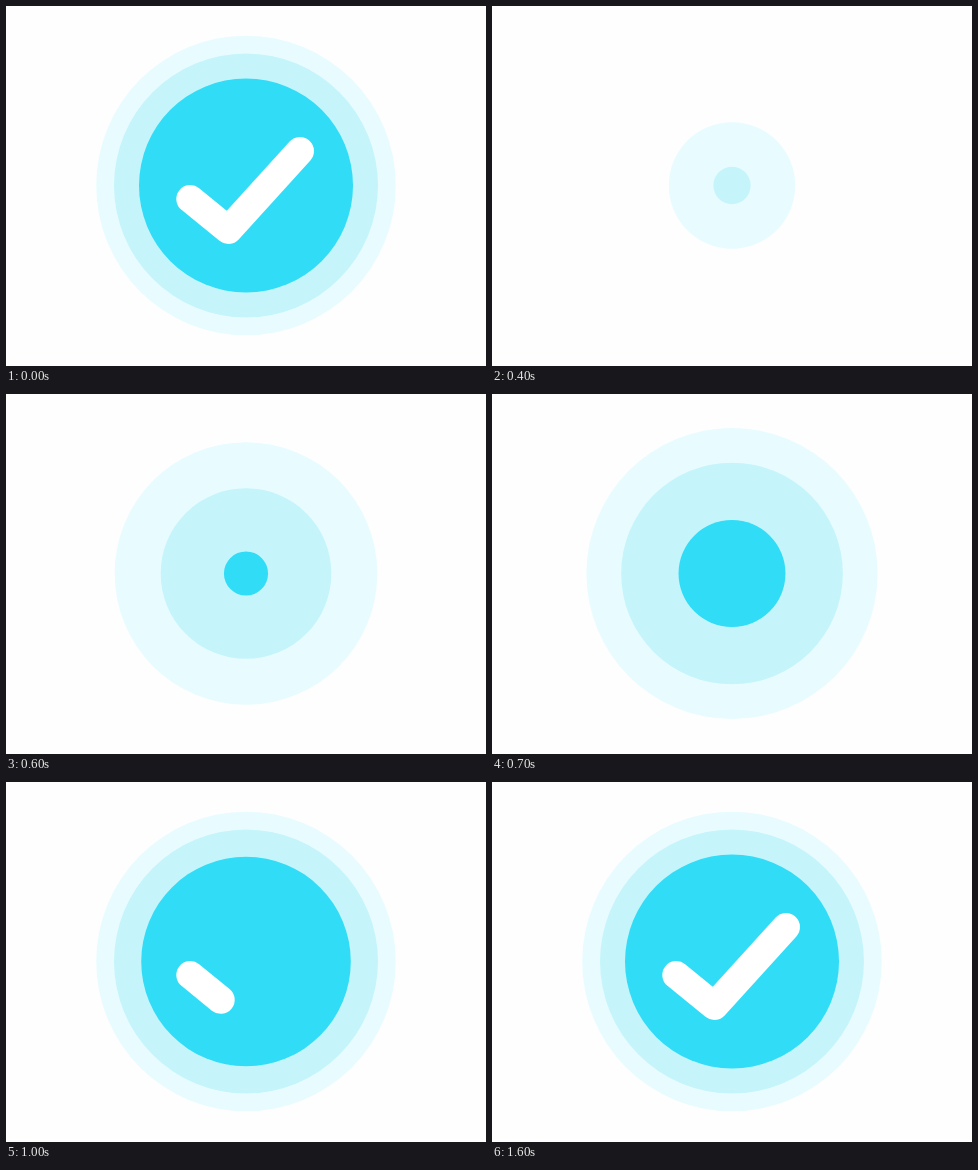
Write an HTML page that moves like this. It is 480 px wide and 360 px high and loops after 2.3 s.

```html
<!DOCTYPE html>
<html lang="en">
<head>
<meta charset="utf-8">
<title>Check mark</title>
<style>
  html, body { margin: 0; width: 100%; height: 100%; overflow: hidden; background: #fefefe; }
  svg { display: block; width: 480px; height: 360px; }
</style>
</head>
<body>
<svg viewBox="0 0 480 360">
  <g id="discs">
    <circle cx="240" cy="179.5" fill="#e8fcff"/>
    <circle cx="240" cy="179.5" fill="#c5f5fb"/>
    <circle cx="240" cy="179.5" fill="#31dcf7"/>
  </g>
  <path id="check" d="M184.3 193 L222.3 224 L294 145" pathLength="1" fill="none"
        stroke="#fff" stroke-width="28" stroke-linecap="round" stroke-linejoin="round"/>
</svg>
<script>
const LOOP = 2300, STEP = 100;
const discs = document.querySelectorAll('#discs circle');
const check = document.getElementById('check');

// Final radius, start and duration in ms, and x of the two easing handles
const growth = [
  [149.8, 200, 600, 0.27, 0.4],
  [132, 300, 600, 0.21, 0.52],
  [107, 465, 625, 0.27, 0.4]
];
const drawing = [1, 850, 620, 0.27, 0.4];

// Cubic Bezier easing with handles (x1, 0) and (x2, 1)
function ease(x, x1, x2) {
  if (x <= 0) return 0;
  if (x >= 1) return 1;
  let lo = 0, hi = 1;
  for (let i = 0; i < 24; i++) {
    const s = (lo + hi) / 2, r = 1 - s;
    if (3 * x1 * s * r * r + 3 * x2 * s * s * r + s * s * s < x) lo = s;
    else hi = s;
  }
  return lo * lo * (3 - 2 * lo);
}

const valueAt = (t, [end, start, duration, x1, x2]) =>
  end * ease((t - start) / duration, x1, x2);

function draw(now) {
  const step = Math.floor(now % LOOP / STEP) * STEP;
  const t = step || LOOP; // the loop opens on the finished badge
  discs.forEach((disc, i) => disc.setAttribute('r', valueAt(t, growth[i])));
  const part = valueAt(t, drawing);
  check.setAttribute('visibility', part ? 'visible' : 'hidden');
  check.setAttribute('stroke-dasharray', part < 1 ? `${part} 2` : 'none');
}

const begin = performance.now();
function tick() {
  draw(performance.now() - begin);
  requestAnimationFrame(tick);
}
tick();
</script>
</body>
</html>
```
